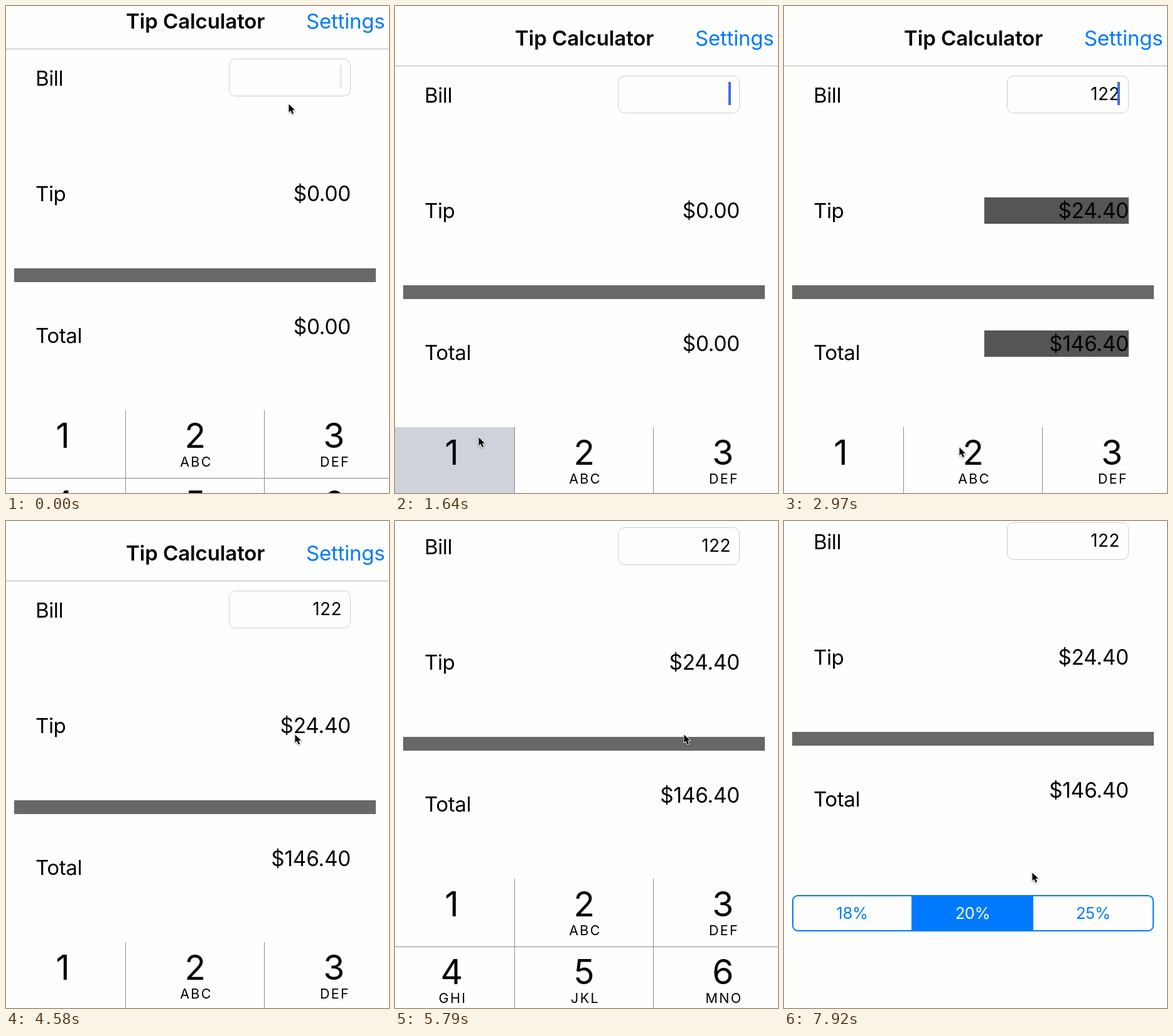
An HTML page with a canvas for the animation above (8000 ms loop, 610x776 px).

```html
<!DOCTYPE html>
<html lang="en">
<head>
<meta charset="utf-8">
<title>Tip Calculator</title>
<style>
  html, body { margin: 0; width: 100%; height: 100%; overflow: hidden; background: #fefefe; }
  canvas { display: block; }
</style>
</head>
<body>
<canvas id="stage" width="610" height="776"></canvas>
<script>
const ctx = document.getElementById('stage').getContext('2d');
const W = 610, H = 776, LOOP = 8000, STEP = 146.7;
const PAPER = '#fefefe', BLUE = '#007aff', LINE = '#8c8c8c';
const FACE = 'Inter, "Liberation Sans", sans-serif';

const BILL = '122', TYPED = [1750, 2780, 2920], HOLD = 290, BLINK = 1020;
const LETTERS = ['', 'ABC', 'DEF', 'GHI', 'JKL', 'MNO'];
const KEY_TOP = 671, KEY_H = 108, KEY_W = 221;

const clamp = v => Math.max(0, Math.min(1, v));
const ramp = (t, from, to) => clamp((t - from) / (to - from));
const ease = (t, from, to) => {
  const k = ramp(t, from, to);
  return k * k * (3 - 2 * k);
};

// The screen refreshes at a coarse, even rate
const snap = t => Math.floor(t / STEP + 0.12) * STEP;

const scrollAt = t =>
  -27 * (1 - ease(t, 0, 900)) - 107 * ease(t, 4720, 5893) - 2 * ease(t, 6165, 6590);

function pointerAt(t) {
  let x = 450, y = 156;
  const glide = (from, to, toX, toY) => {
    const k = ease(t, from, to);
    x += (toX - x) * k;
    y += (toY - y) * k;
  };
  glide(600, 1460, 133, 687);
  glide(1760, 2200, 279, 703);
  glide(3100, 3960, 460, 340);
  glide(6165, 6590, 400, 361);
  glide(6960, 7180, 360, 393);
  glide(7330, 7920, 395, 560);
  return [Math.round(x), Math.round(y)];
}

function heldKey(t) {
  const held = end => t >= end - HOLD && t < end;
  return held(TYPED[0]) ? 0 : held(TYPED[2]) ? 1 : -1;
}

function flashAt(t) {
  const pulse = (from, fade, to) => t < from ? 0 : 1 - ramp(t, fade, to);
  return Math.max(pulse(TYPED[0], 1910, 2200), pulse(TYPED[1], 3080, 3660));
}

function caretAt(t) {
  if (t > 7000) return 0;
  if (t > 1020 && t < TYPED[1]) return 1;
  const phase = (t < BLINK ? t + 18 : t - TYPED[1]) % BLINK;
  return Math.min(ramp(phase, 0, 150), 1 - ramp(phase, 440, 700));
}

function rect(x, y, w, h, color) {
  ctx.fillStyle = color;
  ctx.fillRect(x, y, w, h);
}

function outline(x, y, w, h, radius, color, line) {
  ctx.strokeStyle = color;
  ctx.lineWidth = line;
  ctx.beginPath();
  ctx.roundRect(x + line / 2, y + line / 2, w - line, h - line, radius);
  ctx.stroke();
}

function text(str, x, y, size, { align = 'left', color = '#000', weight = 400, gap = -0.012 } = {}) {
  ctx.font = `${weight} ${size}px ${FACE}`;
  ctx.letterSpacing = `${(gap * size).toFixed(2)}px`;
  ctx.textAlign = align;
  ctx.fillStyle = color;
  ctx.fillText(str, x, y);
}

function amount(value, y, t) {
  ctx.globalAlpha = flashAt(t);
  rect(319, y - 33, 230, 42, '#555');
  ctx.globalAlpha = 1;
  text('$' + value.toFixed(2), 549, y, 33.3, { align: 'right', gap: -0.006 });
}

function form(t) {
  text('Tip Calculator', 191, 63, 33, { weight: 600, gap: -0.003 });
  text('Settings', 478, 63, 33, { color: BLUE, gap: -0.006 });
  rect(0, 95, W, 1, '#b2b2b2');

  text('Bill', 47, 154, 33);
  text('Tip', 47, 338, 33);
  text('Total', 47, 564, 33);

  const bill = BILL.slice(0, TYPED.filter(at => t >= at).length);
  outline(355, 111, 194, 60, 10, '#ccc', 1);
  text(bill, 535, 150, 28, { align: 'right', gap: 0.015 });
  ctx.globalAlpha = caretAt(t);
  rect(531, 121, 4, 37, '#4169ea');
  ctx.globalAlpha = 1;

  amount(bill * 0.2, 338, t);
  rect(13, 445, 576, 22, '#686868');
  amount(bill * 1.2, 550, t);
}

function segments() {
  outline(13, 705, 576, 58, 8, BLUE, 2);
  rect(203, 705, 194, 58, BLUE);
  ['18%', '20%', '25%'].forEach((label, i) =>
    text(label, 108.5 + 192 * i, 743, 25.5, { align: 'center', color: i === 1 ? '#fff' : BLUE }));
}

function keypad(held) {
  rect(0, KEY_TOP, W, 4 * KEY_H, PAPER);
  LETTERS.forEach((letters, i) => {
    const col = i % 3, y = KEY_TOP + KEY_H * Math.floor(i / 3);
    const left = KEY_W * (col - 1) + 191, x = left + (col ? 110 : 120);
    if (i === held) rect(left, y, KEY_W - 1, KEY_H, '#ced3db');
    text(i + 1, x, y + 60, 55, { align: 'center' });
    text(letters, x + 2, y + 90, 21.5, { align: 'center', gap: 0.11 });
  });
  for (const i of [0, 1]) {
    rect(190 + KEY_W * i, KEY_TOP, 1, 4 * KEY_H, LINE);
    rect(0, KEY_TOP + KEY_H * (i + 1), W, 1, LINE);
  }
}

function pointer(x, y) {
  ctx.save();
  ctx.translate(x, y);
  ctx.scale(0.94, 0.94);
  const arrow = new Path2D('M.5 .5V14L3.6 11.2L6 17L8.6 16L6.2 10.4H10.6Z');
  ctx.shadowColor = 'rgba(0,0,0,0.4)';
  ctx.shadowBlur = 3;
  ctx.shadowOffsetY = 1;
  ctx.strokeStyle = '#fff';
  ctx.lineWidth = 2;
  ctx.lineJoin = 'round';
  ctx.stroke(arrow);
  ctx.shadowColor = 'transparent';
  ctx.fillStyle = '#000';
  ctx.fill(arrow);
  ctx.restore();
}

function draw(t) {
  rect(0, 0, W, H, PAPER);
  ctx.save();
  ctx.translate(0, Math.round(scrollAt(t)));
  form(t);
  segments();
  ctx.translate(0, 4 * KEY_H * ease(t, 6960, 7180));
  keypad(heldKey(t));
  ctx.restore();
  pointer(...pointerAt(t));
}

const begin = performance.now();
function tick() {
  draw(snap((performance.now() - begin) % LOOP));
  requestAnimationFrame(tick);
}
tick();
</script>
</body>
</html>
```
